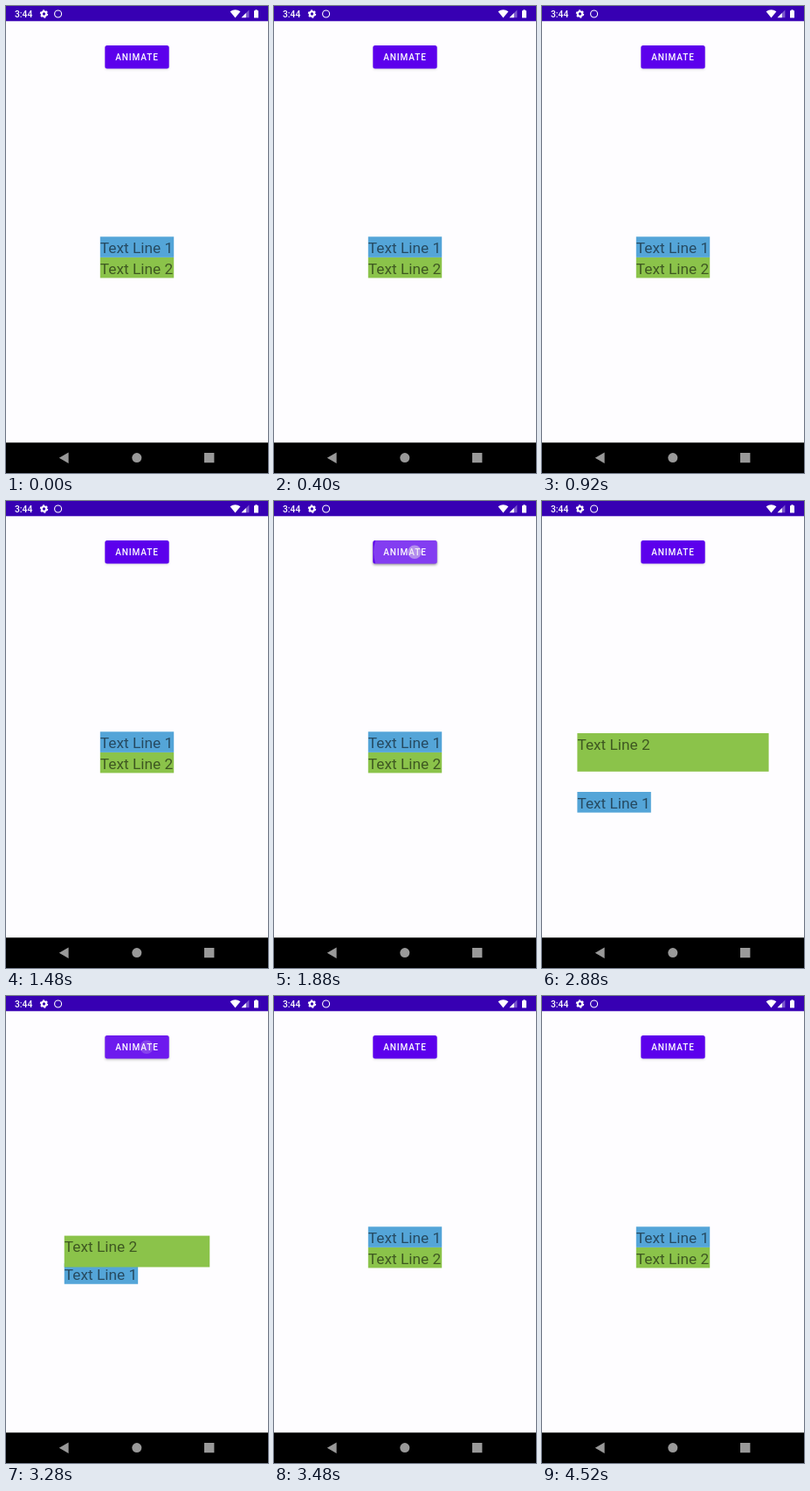
Write an HTML page that moves like this. It is 300 px wide and 533 px high and loops after 4960 ms.

```html
<!DOCTYPE html>
<html lang="en">
<head>
<meta charset="utf-8">
<title>Layout transition</title>
<style>
  html, body { margin: 0; width: 100%; height: 100%; overflow: hidden; background: #fefdff; }
  svg { display: block; width: 100%; height: 100%; }
  text { font-family: Roboto, sans-serif; }
  .line { font-size: 17.3px; fill: #000; fill-opacity: .55; }
  .label { font-weight: 500; font-size: 10px; fill: #fff; }
</style>
</head>
<body>
<svg viewBox="0 0 300 533">
  <defs>
    <clipPath id="clip"><rect x="113.3" y="45" width="73.4" height="26.6" rx="2.5"/></clipPath>
    <filter id="blur" x="-20%" y="-50%" width="140%" height="200%"><feGaussianBlur stdDeviation="1.8"/></filter>
  </defs>

  <rect width="300" height="17.3" fill="#3700b3"/>
  <text class="label" x="10" y="12.8" style="font-size:10.3px">3:44</text>
  <g fill="#fff">
    <g fill="none" stroke="#fff">
      <circle cx="43.5" cy="9" r="2.7" stroke-width="2.1"/>
      <circle cx="43.5" cy="9" r="4.1" stroke-width="1.2" stroke-dasharray="2.15 2.143"/>
      <circle cx="59.6" cy="9" r="4" stroke-width="1.1"/>
    </g>
    <path d="M262.5 13.5L256.6 6.3Q262.5 2.2 268.4 6.3Z"/>
    <path d="M269.6 13.2H278.4V4.6Z" opacity=".35"/>
    <path d="M269.6 13.2H274.8V8.1Z"/>
    <path d="M284 5.2H285.4V4.2H287.6V5.2H289V13.4H284Z"/>
  </g>

  <rect id="shadow" x="113.3" y="46.5" width="73.4" height="26.6" rx="2.5" filter="url(#blur)"/>
  <g clip-path="url(#clip)">
    <rect x="113" y="45" width="74" height="27" fill="#5c00ec"/>
    <circle id="ripple" cx="161" cy="58.3" fill="#fff"/>
  </g>
  <text class="label" x="125.2" y="62" letter-spacing=".9">ANIMATE</text>
  <circle id="touch" cx="161" cy="58.3" r="7.8" fill="#e6e0ea"/>

  <g id="blue">
    <rect width="84.4" height="23.6" fill="#54a5d8"/>
    <text class="line" y="18.5">Text Line 1</text>
  </g>
  <g id="green">
    <rect id="panel" fill="#8bc34a"/>
    <text class="line" y="18.5">Text Line 2</text>
  </g>

  <rect y="498.3" width="300" height="34.7"/>
  <g fill="#999">
    <path d="M60.8 515.7L71.6 509.4V522Z"/>
    <circle cx="149.8" cy="515.6" r="5.5"/>
    <rect x="227" y="510" width="11.4" height="11.2"/>
  </g>
</svg>
<script>
const LOOP = 4960, MOVE = 200, FADE = 150;
const taps = [{ down: 1760, up: 2028 }, { down: 2910, up: 3195 }];

const $ = id => document.getElementById(id);
const set = (id, attrs) => {
  for (const name in attrs) $(id).setAttribute(name, attrs[name]);
};
const clamp = v => Math.max(0, Math.min(1, v));
const mix = (a, b, p) => a + (b - a) * p;
const ease = (t, start) => (1 - Math.cos(Math.PI * clamp((t - start) / MOVE))) / 2;

function drawLines(t) {
  const p = ease(t, taps[0].up) - ease(t, taps[1].up);
  const x = mix(107.8, 40.4, p);
  set('blue', { transform: `translate(${x} ${mix(263.3, 332, p)})` });
  set('green', { transform: `translate(${x} ${mix(287, 265, p)})` });
  set('panel', { width: 300 - 2 * x, height: mix(23.4, 43.8, p) });
}

function drawTap(t) {
  const tap = t < 2500 ? taps[0] : taps[1];
  const age = t - tap.down;
  const fade = age < 0 ? 0 : 1 - clamp((t - tap.up) / FADE);
  const grow = 1 - (1 - clamp(age / 225)) ** 3;
  const press = clamp(age / 80) * fade;
  set('ripple', { r: 52 * grow, opacity: .24 * press });
  set('touch', { opacity: .5 * press });
  set('shadow', { opacity: mix(.1, .4, press) });
}

function frame(now) {
  const t = now % LOOP;
  drawLines(t);
  drawTap(t);
  requestAnimationFrame(frame);
}
frame(0);
</script>
</body>
</html>
```
